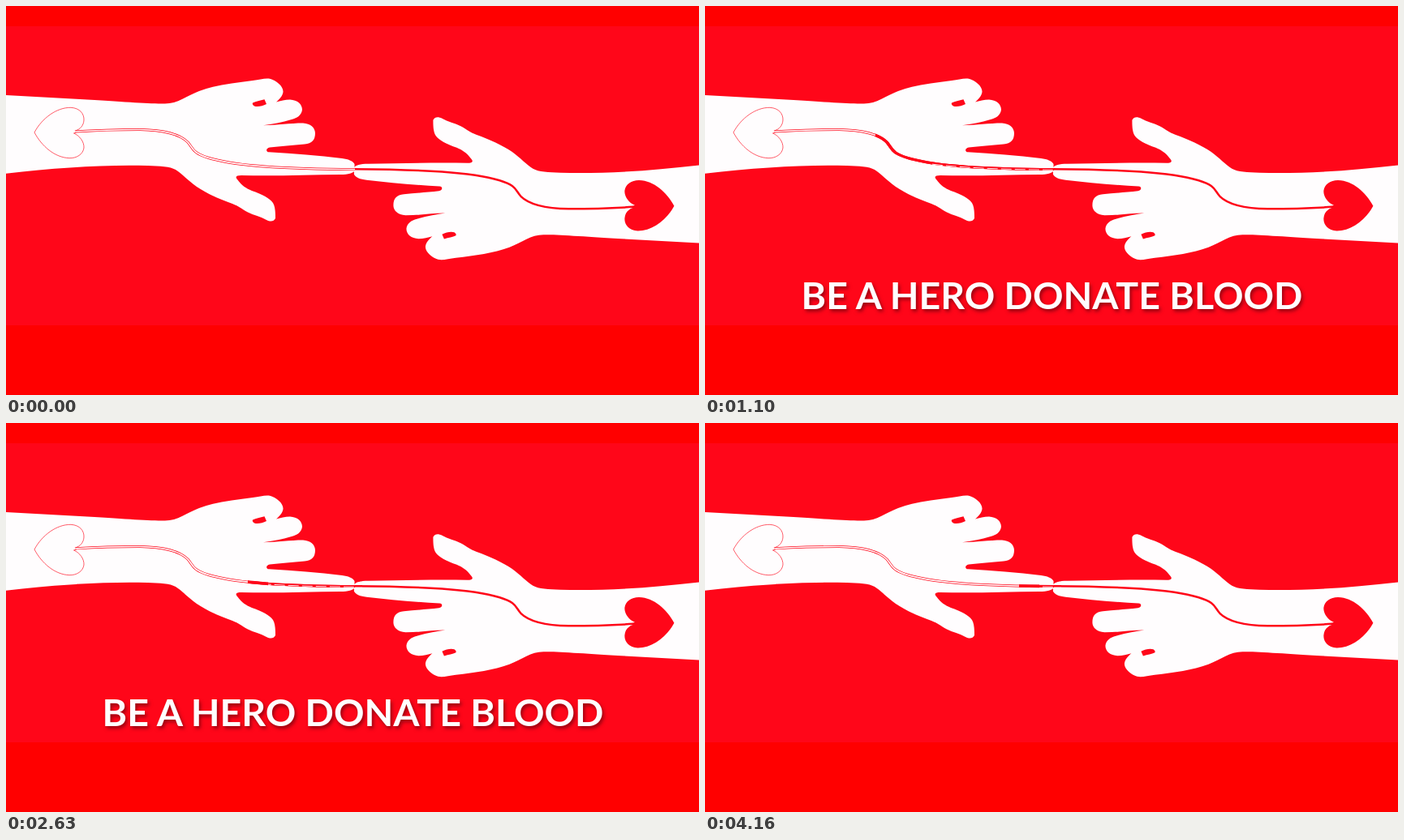
Write an HTML page that moves like this. It is 854 px wide and 480 px high and loops after 4230 ms.

```html
<!DOCTYPE html>
<html lang="en">
<head>
<meta charset="utf-8">
<title>Be a hero</title>
<style>
  html, body { margin: 0; width: 100%; height: 100%; overflow: hidden; background: #f00; }
  svg { display: block; width: 100vw; height: 100vh; }

  .red { fill: #ff0619; }
  .white { fill: #fffdfe; }
  .vein { fill: none; stroke: #ff0619; stroke-width: 2.5; }
  .wide { stroke-width: 3; }
  .fresh { stroke-width: 3.7; }
  .hollow { stroke: #fffdfe; stroke-width: 1.7; }
  .outline { fill: #fffdfe; stroke: #ff0619; stroke-width: .65; }
  .glint { fill: none; stroke: #fffdfe; stroke-width: .9; stroke-dasharray: 13 4; }

  .flow { animation: flow 4230ms infinite; }
  .pour { animation: pour 4230ms infinite; }
  .slogan {
    font: 700 46.5px Lato, sans-serif;
    text-anchor: middle;
    filter: drop-shadow(2px 3px 2px rgba(80, 0, 12, .6));
    animation: fade 4230ms linear infinite;
  }

  /* Blood runs along the vein in discrete steps, twice and a bit per loop. */
  @keyframes flow {
    0%     { transform: translateX(0); animation-timing-function: step-end; }
    2.22%  { transform: translateX(0); animation-timing-function: steps(15); }
    25.86% { transform: translateX(-220px); animation-timing-function: steps(5); }
    33.73% { transform: translateX(-283px); animation-timing-function: steps(3); }
    38.46% { transform: translateX(-342px); animation-timing-function: step-end; }
    46.34% { transform: translateX(0); animation-timing-function: step-end; }
    47.9%  { transform: translateX(0); animation-timing-function: steps(15); }
    71.54% { transform: translateX(-220px); animation-timing-function: steps(5); }
    79.39% { transform: translateX(-283px); animation-timing-function: steps(3); }
    84.12% { transform: translateX(-342px); animation-timing-function: step-end; }
    92.03% { transform: translateX(0); animation-timing-function: step-end; }
    93.55% { transform: translateX(0); animation-timing-function: steps(3); }
    98.27%, 100% { transform: translateX(-43px); animation-timing-function: step-end; }
  }

  /* Then it fills the heart. */
  @keyframes pour {
    0%     { transform: translateX(0); animation-timing-function: step-end; }
    38.46% { transform: translateX(0); animation-timing-function: steps(4); }
    44.78% { transform: translateX(-63px); animation-timing-function: step-end; }
    46.34% { transform: translateX(0); animation-timing-function: step-end; }
    84.12% { transform: translateX(0); animation-timing-function: steps(4); }
    90.45% { transform: translateX(-63px); animation-timing-function: step-end; }
    92.03%, 100% { transform: translateX(0); animation-timing-function: step-end; }
  }

  @keyframes fade {
    0% { opacity: 0; }
    21%, 64% { opacity: 1; }
    86.3%, 100% { opacity: 0; }
  }
</style>
</head>
<body>
<svg viewBox="0 0 854 480" preserveAspectRatio="none">
  <defs>
    <g id="arm">
      <path class="white" d="M-6 109.7 L100 115.5 C150 118.5 175 120.5 196 120.5
        C212 120.5 222 111 238 105 C258 97.500 280 95 304 92 C313 91 320 88.500 326 90
        C333 92 342 99 341.500 106 C341 111 337 115 333 118.500
        C338 117 344 115.500 350 115.500 C359 116 365 121 365 128 C364 135 359 138 352 140
        C340 144 328 145.500 317 147.300 C335 147 350 144.500 366 144.500
        C375 145 381 150 381 157 C381 165 377 170 368 170.500 C353 172 338 173 325 174.500
        C320 175.500 320 180 324 180.300 C355 182 385 184.500 414 188
        C422 189 427 191 429.500 195 V203 C428 206.500 422 208 412 208
        C370 208.500 330 210 290 209 C284 209 282 210.500 285 214
        C291 222 296 225 303 228 C315 232 325 237 329 243 C332 248 332 256 332 262
        C330 266 326 266.500 321 264 C314 260 305 258 298 254.500
        C290 250 287 247 279 244 C262 238 247 231 235 223 C224 215 217 207 209 202
        C202 198 190 197.500 175 197 C120 195.500 60 199.500 -6 207.500 Z"/>
      <path class="red" d="M304 119.500 C308 117.500 313 117 318.500 115.300 L321 121
        C316 123.500 310 125 306 123.500 Q303 121.500 304 119.500 Z"/>
    </g>
    <path id="heart" d="M35 156 C44 139 62 125 80 125.300 C91 126 96.500 133 96 141
      C95.500 148 91 152 86 153.800 L88 155.200 L83.500 157
      C91 160 96.500 168 96 175 C95 183 87 188 78 187.700 C60 187 44 173 35 156 Z"/>
    <path id="vein" d="M85 155 C115 153 140 152.500 165 152.500 C195 153 214 158 224 168
      C231 176 229 181 250 187.500 C285 198 345 201 430 201.600"/>
    <clipPath id="filled"><rect class="flow" x="430" y="140" width="400" height="80"/></clipPath>
    <clipPath id="front"><rect class="flow" x="430" y="140" width="25" height="80"/></clipPath>
    <clipPath id="poured"><rect class="pour" x="97" y="120" width="70" height="75"/></clipPath>
  </defs>

  <rect width="854" height="480" fill="#f00"/>
  <rect class="red" y="25" width="854" height="369"/>

  <use href="#arm"/>
  <g transform="rotate(180 429.2 201.4)">
    <use href="#arm"/>
    <use href="#heart" class="red"/>
    <use href="#vein" class="vein"/>
  </g>

  <use href="#heart" class="outline"/>
  <use href="#vein" class="vein wide"/>
  <use href="#vein" class="vein hollow"/>

  <g clip-path="url(#poured)"><use href="#heart" class="red"/></g>
  <g clip-path="url(#filled)">
    <use href="#vein" class="vein wide"/>
    <path class="glint" d="M103 153.700H150M280 195.200C325 200.500 380 201.800 430 202.200"/>
  </g>
  <g clip-path="url(#front)"><use href="#vein" class="vein fresh"/></g>

  <text class="slogan white" x="427.500" y="374">BE A HERO DONATE BLOOD</text>
</svg>
</body>
</html>
```
